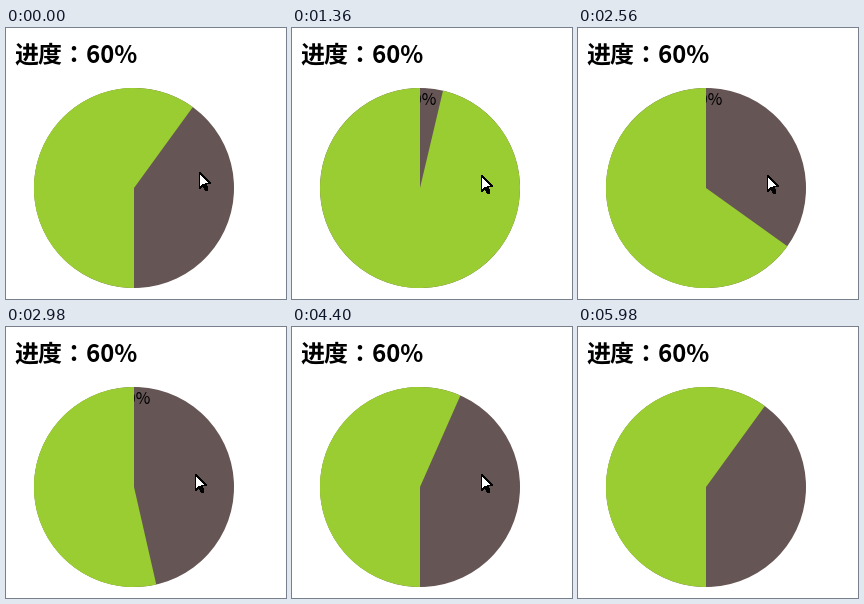
Recreate the animation shown at these times as a matplotlib script. Size 280 by 271 pixels, loop 6230 ms.

```python
import matplotlib.pyplot as plt
import numpy as np
from matplotlib.animation import FuncAnimation
from matplotlib.patches import Circle, Polygon, Wedge

W, H, DPI = 280, 271, 100
PX = 72 / DPI
LOOP, TICK = 6230, 10
CENTER, RADIUS = (128, 160), 100
GREEN, BROWN = "#9acd32", "#665555"
FONT = "Noto Sans CJK JP"

# The cover turns in visible steps: half a turn in about 2 s, then 36 degrees in 2 s.
STEPS = [1360, 1510, 1660, 1780, 1930, 2050, 2170, 2290, 2440, 2560,
         2710, 2830, 2980, 3100, 3220, 3340, 3490, 3620, 3770, 3890,
         4020, 4160, 4280, 4400, 4550, 4670, 4790, 4940, 5060]
TURN_TIMES = [1360, 2050, 2560, 3110, 5060]
TURN_ANGLES = [13.3, 78, 125.6, 180, 216]

# Start time and tip of the pointer; None hides it.
POINTER = [(0, (193, 144)), (120, (192, 144)), (520, (189, 147)),
           (5740, (204, 182)), (5860, (233, 254)), (5980, None)]
ARROW = np.array([(0, 0), (0, 16), (4, 12), (6, 17), (7, 18),
                  (8, 17), (6, 12), (6, 11), (11, 11)]) + 0.5


def cover_angle(ms):
    if ms < STEPS[0]:
        return TURN_ANGLES[-1]
    held = max(step for step in STEPS if step <= ms)
    return np.interp(held, TURN_TIMES, TURN_ANGLES)


def pointer_tip(ms):
    return [tip for start, tip in POINTER if start <= ms][-1]


def half_disc(angle):
    return Wedge(CENTER, RADIUS, angle - 90, angle + 90, fc=GREEN, lw=0, zorder=3)


fig = plt.figure(figsize=(W / DPI, H / DPI), dpi=DPI, facecolor="white")
ax = fig.add_axes([0, 0, 1, 1])
ax.set(xlim=(0, W), ylim=(H, 0))
ax.axis("off")

ax.text(8, 34, "进度：60%", family=FONT, weight="bold", size=24 * PX, va="baseline")
ax.add_patch(Circle(CENTER, RADIUS, fc=BROWN, lw=0, zorder=1))
ax.text(128, 77, "60%", family=FONT, size=16 * PX, ha="center", va="baseline", zorder=2)
ax.add_patch(half_disc(180))
cover = ax.add_patch(half_disc(216))
pointer = ax.add_patch(Polygon(ARROW, fc="white", ec="black", lw=PX,
                               antialiased=False, zorder=5))


def update(frame):
    ms = frame * TICK
    angle = cover_angle(ms)
    cover.set_theta1(angle - 90)
    cover.set_theta2(angle + 90)
    tip = pointer_tip(ms)
    pointer.set_visible(tip is not None)
    if tip is not None:
        pointer.set_xy(ARROW + tip)
    return cover, pointer


anim = FuncAnimation(fig, update, frames=LOOP // TICK, interval=TICK,
                     repeat=True, repeat_delay=0, blit=False)
plt.show()
```
